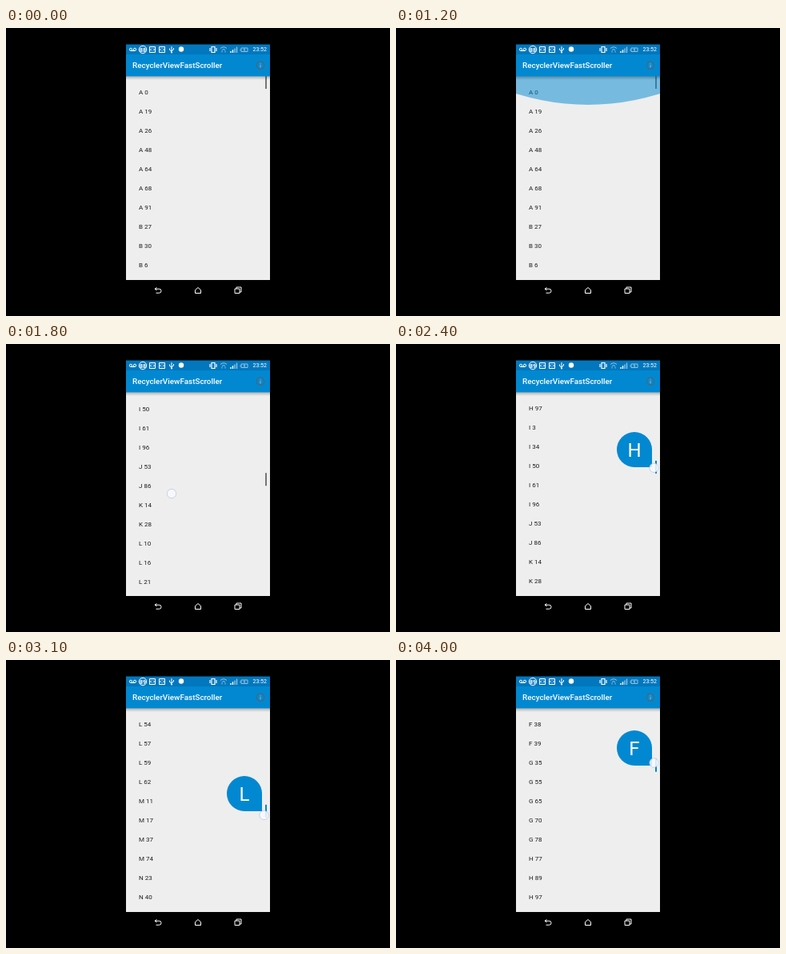
An HTML page with a canvas for the animation above (4100 ms loop, 480 by 360 pixels).

```html
<!DOCTYPE html>
<html>
<head>
<meta charset="utf-8">
<style>
html, body { margin: 0; width: 480px; height: 360px; overflow: hidden; background: #000; }
canvas { display: block; }
</style>
</head>
<body>
<canvas id="stage" width="480" height="360"></canvas>
<script>
const ctx = document.getElementById('stage').getContext('2d');
const LOOP = 4100, STEP = 100, ROW = 24, MAX_SCROLL = 2160;
const TOP = 60, TRAVEL = 240, DRAG_START = 2200;
const BLUE = '#0288d1', DIM = '#8fc3e2', WHITE = '#fff';

function makeItems() {
  const named = `A 0 19 26 48 64 68 91,B 27 30 6 66,C 44 93 94,D 13 22 81 83 9,E 2 56 63 67 8,
    F 15 25 38 39,G 35 55 65 70 78,H 77 89 97,I 3 34 50 61 96,J 53 86,K 14 28,
    L 10 16 21 31 42 54 57 59 62,M 11 17 37 74,N 23 40`.split(',').flatMap(group => {
    const [letter, ...numbers] = group.trim().split(' ');
    return numbers.map(n => letter + ' ' + n);
  });
  // The numbers left over are spread over the letters O to Z
  const used = new Set(named.map(s => +s.slice(2)));
  const rest = Array.from({ length: 100 }, (_, n) => n)
    .filter(n => !used.has(n))
    .map(n => String.fromCharCode(79 + n * 7 % 12) + ' ' + n);
  return named.concat(rest.sort());
}
const items = makeItems();

// Smooth step from 0 at time a to 1 at time b
function ease(a, b, t) {
  const p = Math.min(1, Math.max(0, (t - a) / (b - a)));
  return p * p * (3 - 2 * p);
}

const scrollAt = t => 281 * (ease(200, 700, t) - ease(800, 1100, t))
  + 911 * ease(1400, 1800, t) + 15 * ease(1800, 2100, t);

const thumbAt = t => 160 - 40 * ease(2200, 2700, t)
  + 180 * ease(2780, 3600, t) - 238 * ease(3600, 4200, t);

const swipes = [
  { from: 200, to: 400, x: 228, y: 258, dy: -98 },
  { from: 800, to: 1000, x: 232, y: 144, dy: 106 },
  { from: 1400, to: 1600, x: 209, y: 318, dy: -113 },
  { from: 1800, to: 2000, x: 207, y: 187, dy: -15 }
];

function fingerAt(t) {
  if (t >= DRAG_START) return [322.5, thumbAt(t + 10) + 10];
  const s = swipes.find(s => t >= s.from && t <= s.to);
  return s && [s.x, s.y + s.dy * (t - s.from) / (s.to - s.from)];
}

function rect(x, y, w, h, color) {
  ctx.fillStyle = color;
  ctx.fillRect(x, y, w, h);
}

function circle(x, y, r, fill, stroke, width = 1) {
  ctx.beginPath();
  ctx.arc(x, y, r, 0, Math.PI * 2);
  if (fill) { ctx.fillStyle = fill; ctx.fill(); }
  if (stroke) { ctx.strokeStyle = stroke; ctx.lineWidth = width; ctx.stroke(); }
}

function path(d, color = WHITE, width = 1) {
  ctx.strokeStyle = color;
  ctx.lineWidth = width;
  ctx.stroke(new Path2D(d));
}

function text(s, x, y, size, color, weight = 400, align = 'left') {
  ctx.font = `${weight} ${size}px Roboto, sans-serif`;
  ctx.textAlign = align;
  ctx.fillStyle = color;
  ctx.fillText(s, x, y);
}

function clipped(x, y, w, h, paint) {
  ctx.save();
  ctx.beginPath();
  ctx.rect(x, y, w, h);
  ctx.clip();
  paint();
  ctx.restore();
}

function drawList(scroll) {
  clipped(150, 68, 180, 240, () => items.forEach((item, i) => {
    const y = 83.4 + i * ROW - scroll;
    if (y > 50 && y < 330) text(item, 166, y, 8, '#1c1c1c');
  }));
}

function drawGlow(t) {
  const strength = ease(1000, 1200, t) - ease(1200, 1500, t);
  if (!strength) return;
  clipped(150, TOP, 180, 255, () => {
    ctx.globalAlpha = strength / 2;
    circle(240, TOP + 36 * strength - 296, 296, BLUE);
  });
}

function drawStatusIcons(t) {
  ctx.save();
  ctx.translate(0, 0.5);
  for (const x of [156, 161]) circle(x, 26.3, 1.6, null, WHITE);
  path('M156 28h5');
  circle(171, 26.5, 4.7, null, WHITE);
  text(t < 1900 ? '88' : '89', 171, 29, 7, WHITE, 700, 'center');
  for (const x of [183, 195])
    path(`M${x - 3.5} 23h7v7h-7zM${x - 1} 25l-1.5 1.5 1.5 1.5M${x + 1} 25l1.5 1.5-1.5 1.5`);
  path('M207 22.5v8M204.5 25v2l2.5 1.5M209.5 24.5v2l-2.5 1.5');
  circle(207, 30, 1, WHITE);
  circle(219, 26, 3.2, WHITE);
  path('M257 23h4v7h-4zM255 24.5v4M263 24.5v4', WHITE, 1.2);
  path('M268 25q4-3.5 8 0M270 27q2-1.8 4 0M270 30v-2M274 30v-2', DIM);
  for (let i = 0; i < 4; i++)
    path(`M${281 + i * 2.5} 30.5v${-2 - i * 1.8}`, i < 2 ? WHITE : DIM, 1.4);
  path('M294 24.5h8v4.5h-8zM293 26v2M298.5 24.5l-1.5 2.2h2l-1.5 2.3', DIM);
  text('23:52', 308.5, 28.9, 7, WHITE);
  ctx.restore();
}

function drawBars(t) {
  rect(150, 20.5, 180, 12.5, '#0277bd');
  rect(150, 33, 180, 27.5, BLUE);
  const shade = ctx.createLinearGradient(0, 60.5, 0, 65);
  shade.addColorStop(0, 'rgba(0,0,0,.25)');
  shade.addColorStop(1, 'rgba(0,0,0,0)');
  rect(150, 60.5, 180, 4.5, shade);
  text('RecyclerViewFastScroller', 158, 50, 9.9, WHITE, 500);
  circle(318, 46.7, 4.7, null, '#47697c', 1.3);
  path('M318 45.8v3.6M318 43.4v1.2', '#8aa9b9', 1.3);
  drawStatusIcons(t);

  // Navigation keys
  path('M188.5 324.5l-2.5 1.7 2.5 1.7M186 326.2h5.5a2.5 2.5 0 0 1 0 5h-4');
  path('M236.5 327.5l3.5-3 3.5 3v4h-7z');
  path('M288 326v-2h6v6h-2M286 326h6v5.5h-6z');
}

function drawBubble(letter, bottom) {
  ctx.beginPath();
  ctx.roundRect(276, bottom - 44, 44, 44, [22, 22, 0, 22]);
  ctx.fillStyle = BLUE;
  ctx.fill();
  text(letter, 298, bottom - 13, 24, WHITE, 400, 'center');
}

function draw(t) {
  const dragging = t >= DRAG_START;
  let scroll = scrollAt(t), thumb = TOP + scroll / MAX_SCROLL * TRAVEL, index = 0;
  if (dragging) {
    thumb = thumbAt(t);
    index = Math.min(99, Math.floor((thumb - TOP) / TRAVEL * 100));
    scroll = Math.min(index * ROW, MAX_SCROLL);
  }
  rect(0, 0, 480, 360, '#000');
  rect(150, TOP, 180, 255, '#eee');
  drawList(scroll);
  rect(324, thumb, 2, 16, dragging ? BLUE : '#757575');
  drawGlow(t);
  drawBars(t);
  if (dragging) drawBubble(items[index][0], Math.round(thumb + 8));
  const finger = fingerAt(t);
  if (finger) circle(...finger, 5.7, 'rgba(248,249,255,.85)', 'rgba(165,180,215,.6)', 0.9);
}

const start = performance.now();
function tick() {
  const t = (performance.now() - start) % LOOP;
  draw(Math.floor(t / STEP) * STEP);
  requestAnimationFrame(tick);
}
tick();
</script>
</body>
</html>
```
